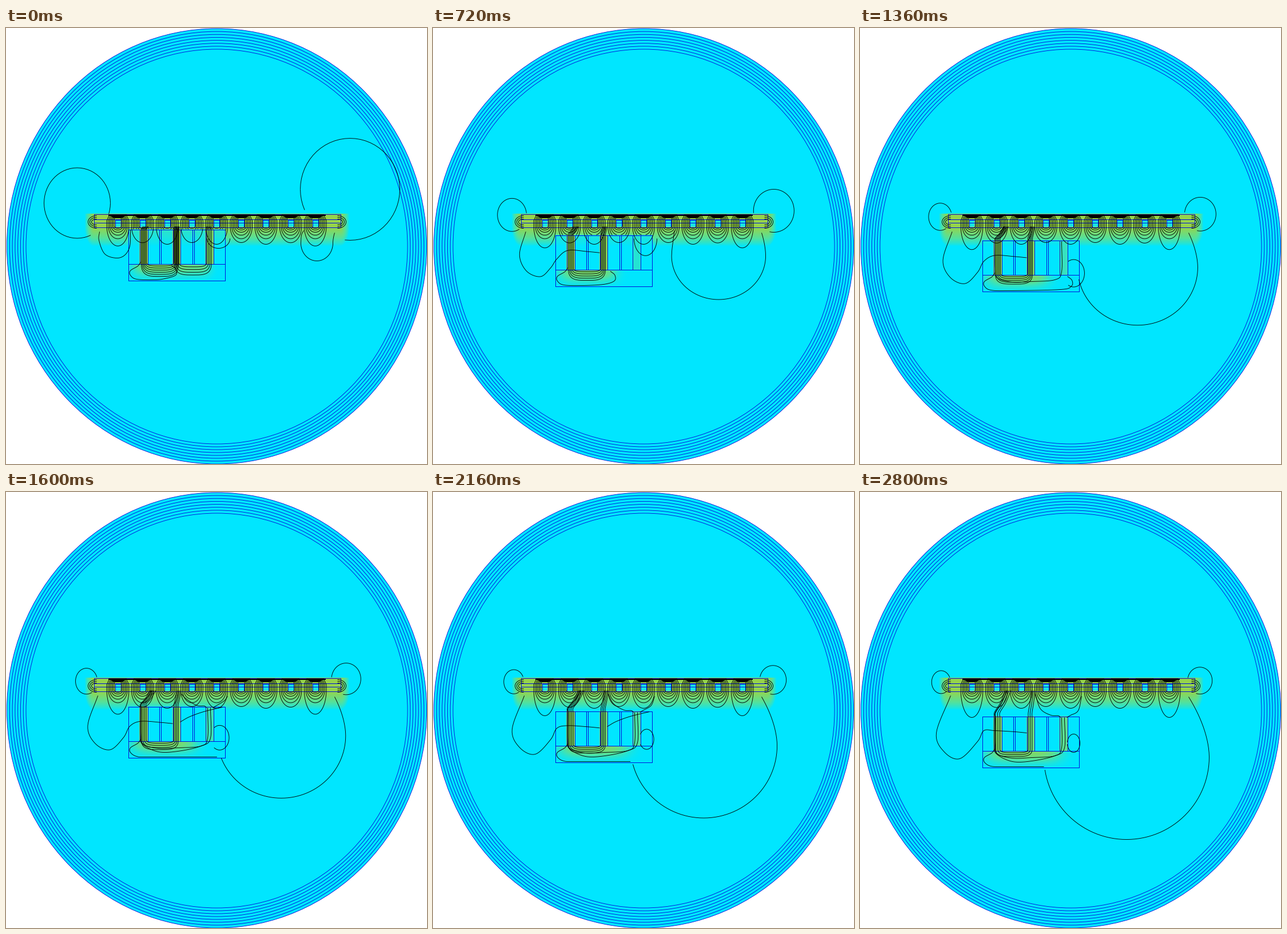
Animation, 736 px wide and 761 px high, one loop 3040 ms. Source, as a matplotlib script:

```python
import numpy as np
import matplotlib.pyplot as plt
from matplotlib.animation import FuncAnimation
from matplotlib.collections import LineCollection
from matplotlib.patches import Ellipse, Polygon

W, H, DPI = 736, 761, 100
STEP, FRAMES, LAST = 80, 38, 35
CYAN, BLUE, BLACK = "#00e6ff", "#0014dc", "#000000"
PX = 72 / DPI

# Rail and moving core geometry, in pixels
RAIL_L, RAIL_T, RAIL_R, RAIL_B = 153, 324, 584, 347
SLOTS = 195 + 43.15 * np.arange(9)
CORE_L, CORE_R, YOKE, CORE_H = 213, 382, 60, 89
START, TRAVEL = 351, 40
POLES = [(233, 247), (291, 304), (348, 362)]


def spline(points, k=9):
    """Catmull-Rom curve through the points."""
    p = np.array(points, float)
    q = np.vstack([2 * p[0] - p[1], p, 2 * p[-1] - p[-2]])
    t = np.linspace(0, 1, k, endpoint=False)[:, None]
    parts = [0.5 * (2 * b + (c - a) * t + (2 * a - 5 * b + 4 * c - d) * t**2
                    + (3 * b - a - 3 * c + d) * t**3)
             for a, b, c, d in zip(q, q[1:], q[2:], q[3:])]
    return np.vstack(parts + [p[-1:]])


def runs(path, keep):
    """Split a path into the pieces where keep is true."""
    cuts = np.flatnonzero(np.diff(keep.astype(int))) + 1
    return [p for p, k in zip(np.split(path, cuts), np.split(keep, cuts))
            if k[0] and len(p) > 1]


def arc(cx, cy, rx, ry, a0=0.0, a1=2 * np.pi, k=61):
    a = np.linspace(a0, a1, k)
    return np.column_stack([cx + rx * np.cos(a), cy + ry * np.sin(a)])


def rect(l, t, r, b):
    return np.array([(l, t), (r, t), (r, b), (l, b), (l, t)], float)


def slot_loop(x, w, cap, bottom):
    """Flux loop around one slot: arc below, flat run in the back iron."""
    top = [(x - w, 336), (x - 0.92 * w, 332), (x - 0.75 * w, cap),
           (x + 0.75 * w, cap), (x + 0.92 * w, 332), (x + w, 336), (x + w, 345)]
    return np.vstack([arc(x, 345, w, bottom - 345, 0, np.pi, 25), top])


def u_turn(x1, x2, top, bottom):
    """Rounded path down one pole, through the yoke and up another."""
    a = np.linspace(np.pi, 0, 27)
    c = np.cos(a)
    x = (x1 + x2) / 2 + (x2 - x1) / 2 * np.sign(c) * np.abs(c) ** 0.55
    y = top + (bottom - top) * np.sin(a) ** 0.7
    return np.column_stack([x, y])


def fan(x, target, top):
    """Line over the air gap from a pole face to a rail magnet."""
    gap = top - 346
    end = x + (target - x) * min(1, gap / 32)
    return spline([(x, top + 2), (x, top - 0.15 * gap),
                   ((x + end) / 2, top - 0.5 * gap), (end, 346)], 5)


def rail_lines(u, top):
    out = []
    for k, x in enumerate(SLOTS):
        for j in range(5):
            p = slot_loop(x, 6.5 + 2.5 * j, 331 - j, 349 + 2.4 * j + 0.55 * j**2)
            inside = (p[:, 1] > top) & (p[:, 0] > CORE_L) & (p[:, 0] < CORE_R)
            out += runs(p, ~inside)
        rim = ((k - 4) / 4) ** 8  # the end slots reach further down
        out.append(slot_loop(x, 19.3, 326, 374 + 3 * (k % 2 == 0) + rim * (3 + 13 * u)))
    for x, side in ((RAIL_L, -1), (RAIL_R, 1)):
        for r in (4, 7, 10):
            out.append(arc(x - 5 * side, 338, side * (r + 5), r + 1, -np.pi / 2, np.pi / 2, 25))
    return out


def core_lines(n, u, top):
    out = []

    def link(x1, x2, t1, t2, depth):
        out.append(np.vstack([(x1, top + 2), u_turn(x1, x2, top + 57, top + depth), (x2, top + 2)]))
        out.append(fan(x1, t1, top))
        out.append(fan(x2, t2, top))

    near = round(6 - 3 * u)
    for v in (np.arange(near) + 0.5) / near:
        link(246 - 11 * v, 292 + 10 * v, 265 - 10 * v, 298 + 9 * v, 62 + (22 - 12 * u) * v)

    right = max(0, 4 - n)
    for v in (np.arange(right) + 0.5) / max(right, 1):
        link(303 - 10 * v, 349 + 11 * v, 305, 346, 63 + 19 * v)

    # Lines that skip the middle pole
    for i in range(int(u > 0.35) + int(u > 0.55)):
        x1, x3, d = 236 - 1.5 * i, 352 + 5 * i, 73 + 6 * i
        out.append(spline([(x1, top + 2), (x1, top + 50), (x1 + 4, top + 66), (266, top + d),
                           (300, top + d - 1), (340, top + 69), (x3, top + 55), (x3, top + 2)]))
        out.append(fan(x1, 257 - 3 * i, top))

    # Outermost line in the yoke: a closed bulge, then joined to the right lobe
    left = [(235, top + 57), (230, top + 64), (217, top + 72), (217, top + 80), (228, top + 87)]
    if u < 0.55:
        r = 299 + 310 * u**2
        out.append(spline(left + [(260, top + 88), (r - 22, top + 86), (r - 3, top + 80),
                                  (r - 2, top + 70), (r - 10, top + 63)]))
    else:
        out.append(spline(left + [(250, top + 88), (lobe_left(u), top + 88)]))
        out.append(spline([(350, top + 2), (346, top - 1), (333, top - 2),
                           (315, top - 13), (306, 352)]))
        out.append(spline([(361, top + 2), (368, top - 2), (381, top - 10), (387, 356)]))
    if 0.5 < u < 0.9:
        out.append(spline([(304, top + 27), (320, top + 18), (345, top + 9), (378, top + 1)]))
    return out


def end_loops(gap):
    """Loops at both rail ends, shrinking as the core moves away."""
    w = 24.7 + 365 / gap
    p = arc(143 - 76 / gap, 334 - 116 / gap, w / 2, w / 2 + 3.5)
    out = runs(p, (p[:, 1] < RAIL_T) | (p[:, 0] < 151))
    w = 29.9 + 576 / gap
    p = arc(593 + 32 / gap, 333.5 - 210 / gap, w / 2, w / 2 + 2, -np.pi, np.pi)
    return out + runs(p, (p[:, 1] < RAIL_T) | (p[:, 0] > 587))


def lobe_left(u):
    return 515 - 194 * u**0.5


def right_lobe(u, top):
    left, right = lobe_left(u), 571 + 39 * u
    cy, bottom = 375 + 87 * u, 406 + 200 * u**0.8
    t = np.linspace(0, 1, 15)
    tail = np.column_stack([right - (right - 574) * t**1.8, cy + (357 - cy) * t])
    bowl = arc((left + right) / 2, cy, (right - left) / 2, bottom - cy, np.pi, 0)
    lead = [spline([(left + 5, 353), (left + 1, cy - 14), (left, cy)])] if left > CORE_R else []
    p = np.vstack(lead + [bowl, tail])
    return runs(p, (p[:, 0] > CORE_R) | (p[:, 1] > top + CORE_H))


def left_lobe(n, u):
    left, bottom = 162 - 29 * u**0.7, 401 + 64 * u**0.5
    side, low = 370 + 50 * u**0.5, 192 - 18 * u
    pts = [(163 - 5 * u, 355), (left, side),
           ((2 * left + low) / 3, (side + 2 * bottom) / 3 + 3), (low, bottom)]
    if n < 3:
        return spline(pts + [(207, bottom - 5), (216, 380), (217, 352)])
    y = 378 + 38 * u
    return spline(pts + [(205, bottom - 10 - 20 * u), (216, y + 20 * (1 - u)),
                         (235, y), (270, y + 2), (291, y + 4)])


def outer_lines(n, u, top):
    out = end_loops(top - RAIL_B) + right_lobe(u, top) + [left_lobe(n, u)]
    if u > 0.35:
        grow = (1 - u) ** 2
        p = arc(373, top + 47 + 40 * grow, 11 + 30 * grow, 16 + 30 * grow, -np.pi, np.pi)
        out += runs(p, p[:, 0] > 362)
    else:
        out.append(arc(371, 367, 20, 17 + 50 * u, 0, np.pi))
    return out


def core_outline(top):
    mid = top + YOKE
    walls = [x for pole in POLES for x in pole] + [267, 270, 325, 328]
    return ([rect(CORE_L, top, CORE_R, top + CORE_H), [(CORE_L, mid), (CORE_R, mid)]]
            + [[(x, top), (x, mid)] for x in walls])


# Flux density shading on a window around the machine
GX, GY = np.meshgrid(np.arange(130, 608), np.arange(320, 486))
off_x = np.maximum(np.maximum(RAIL_L - GX, GX - RAIL_R), 0)
off_y = np.maximum(GY - RAIL_B, 0)
RAIL_GLOW = np.clip(1 - np.hypot(2.1 * off_x, off_y) / 33, 0, 1) ** 0.8 * (GY >= RAIL_T)
for sx in SLOTS:
    RAIL_GLOW[(abs(GX - sx) < 5) & (GY > 333) & (GY < RAIL_B)] = 0.15


def shade(u, top):
    s = RAIL_GLOW.copy()
    mid = top + YOKE
    in_core = (GX >= CORE_L) & (GX <= CORE_R) & (GY >= top)
    s[in_core] *= 0.3
    power = (0.95 - 0.15 * u, 1 - 0.35 * u, max(0.8 - 5 * u, 0.1 + 0.45 * u))
    for (l, r), p in zip(POLES, power):
        s[(GX >= l) & (GX <= r) & (GY >= top) & (GY <= mid)] = p
    fall = np.exp(-((GY - top - 64) / 16) ** 2)
    yoke = 0.8 * np.exp(-((GX - 265 - 21 * u) / (42 + 22 * u)) ** 4)
    yoke += 0.6 * max(0, 1 - 8 * u) * np.exp(-((GX - 330) / 28) ** 4)
    part = in_core & (GY > mid) & (GY < top + CORE_H)
    s[part] = np.clip(yoke * fall, 0, 1)[part]
    rgb = [np.interp(s, [0, 0.5, 1], c) for c in ([0, 85, 150], [230, 225, 212], [255, 155, 75])]
    return np.dstack(rgb).astype(np.uint8)


fig = plt.figure(figsize=(W / DPI, H / DPI), dpi=DPI, facecolor="white")
ax = fig.add_axes([0, 0, 1, 1])
ax.axis("off")


def lines(color, z, segs=(), width=PX):
    return ax.add_collection(LineCollection(list(segs), colors=color, linewidths=width, zorder=z))


# Static scene: shells and rail
ax.add_patch(Ellipse((368, 380.5), 734, 760, fc=CYAN, ec="none", zorder=2))
for v in np.linspace(0, 1, 8):
    ax.add_patch(Ellipse((368, 380.5 + 0.5 * v), 734 - 67 * v, 760 - 71 * v, fc="none",
                         ec=BLUE, lw=0.9 * PX, zorder=3))
rail = [rect(RAIL_L, RAIL_T, RAIL_R, RAIL_B)]
rail += [[(RAIL_L, y), (RAIL_R, y)] for y in (333, 339)]
rail += [rect(x - 5, 334, x + 5, RAIL_B) for x in SLOTS]
lines(BLUE, 5, rail)
for x in SLOTS:
    ax.add_patch(Polygon([(x - 16, 325), (x + 16, 325), (x + 8, 331), (x - 8, 331)],
                         fc=BLACK, ec="none", zorder=6))
lines(BLACK, 6, [[(178, 326), (558, 326)]], 2 * PX)

glow = ax.imshow(shade(0, START), extent=(129.5, 607.5, 485.5, 319.5),
                 interpolation="nearest", aspect="auto", zorder=4)
core = lines(BLUE, 5)
flux = lines(BLACK, 7, width=0.9 * PX)
ax.set_xlim(-0.5, W - 0.5)
ax.set_ylim(H - 0.5, -0.5)


def draw(i):
    n = min(i, LAST)
    u = n / LAST
    top = round(START + TRAVEL * u)
    glow.set_data(shade(u, top))
    core.set_segments(core_outline(top))
    flux.set_segments(rail_lines(u, top) + core_lines(n, u, top) + outer_lines(n, u, top))
    return glow, core, flux


anim = FuncAnimation(fig, draw, frames=FRAMES, init_func=lambda: draw(0),
                     interval=STEP, repeat=True, repeat_delay=0, blit=False)
plt.show()
```
